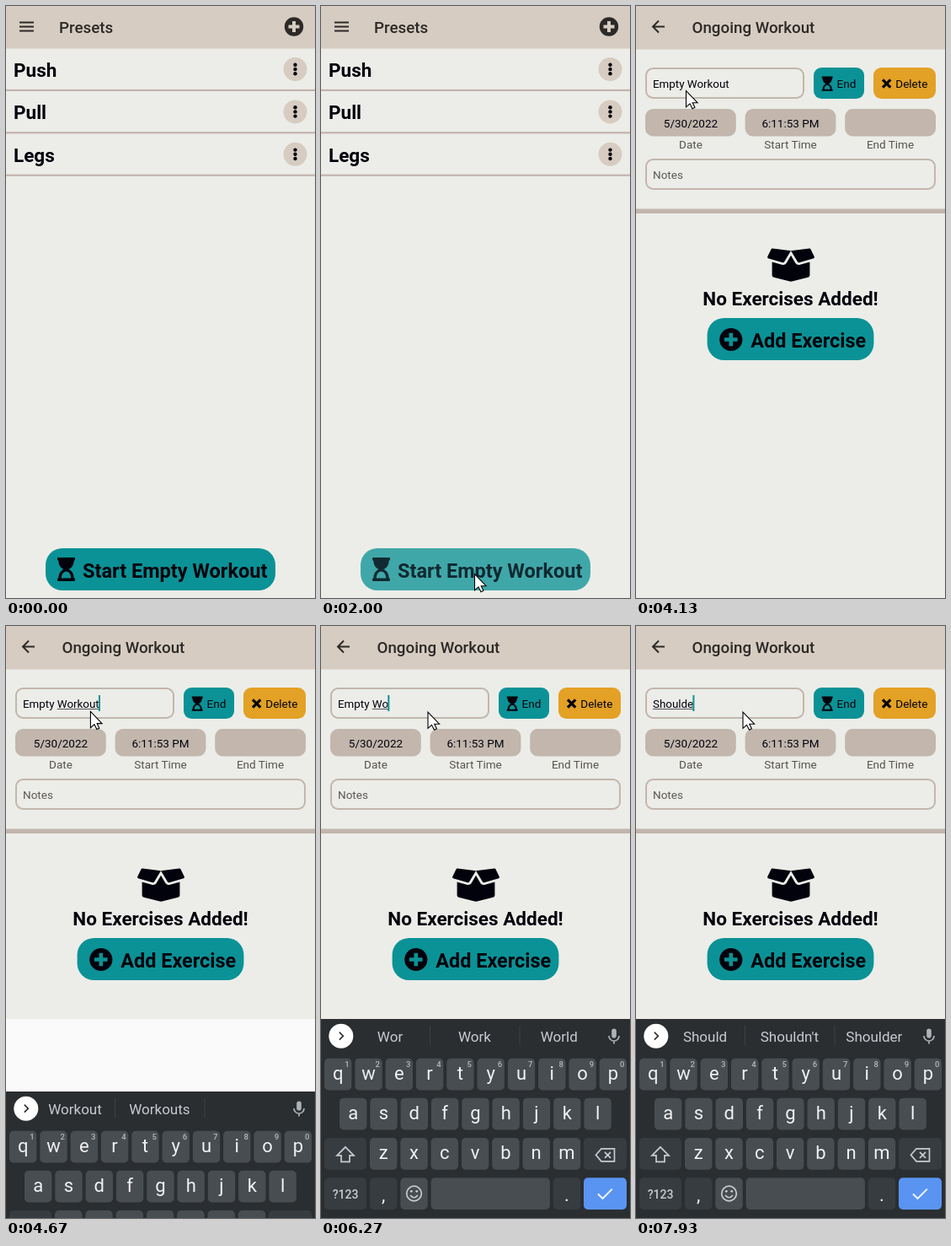
An HTML page that plays this animation: 367 px wide and 702 px high, repeating every 8 s.

```html
<!DOCTYPE html>
<html lang="en">
<head>
<meta charset="utf-8">
<title>Workout app</title>
<style>
  html, body { margin: 0; width: 100%; height: 100%; overflow: hidden; background: #ecede8; }
  svg { display: block; font-family: Roboto, sans-serif; }
  text { white-space: pre; }
</style>
</head>
<body>
<svg id="stage" width="367" height="702" viewBox="0 0 367 702"></svg>
<script>
const INK = '#02020c', DARK = '#2d2927', PAPER = '#ecede8', SAND = '#d7ccc1',
  TAUPE = '#c2b6ad', TEAL = '#0b9296', KEY = '#484d51', FUNC_KEY = '#373c41', PALE = '#c8ccd0';
const RADIUS = 9.3, NAME_SIZE = 13.35;

// SVG helpers
const rect = (x, y, w, h, fill, r = 0, extra = '') =>
  `<rect x="${x}" y="${y}" width="${w}" height="${h}" rx="${r}" fill="${fill}" ${extra}/>`;
const circle = (x, y, r, fill, extra = '') =>
  `<circle cx="${x}" cy="${y}" r="${r}" fill="${fill}" ${extra}/>`;
const text = (s, x, y, size, fill = INK, weight = 400, anchor = 'start', extra = '') =>
  `<text x="${x}" y="${y}" font-size="${size}" fill="${fill}" font-weight="${weight}" text-anchor="${anchor}" ${extra}>${s}</text>`;
const label = (s, x, y, size, fill, weight, extra) => text(s, x, y, size, fill, weight, 'middle', extra);
const line = (d, color, width, extra = '') =>
  `<path d="${d}" fill="none" stroke="${color}" stroke-width="${width}" ${extra}/>`;
const shape = (d, x = 0, y = 0, scale = 1) =>
  `<path d="${d}" transform="translate(${x} ${y}) scale(${scale})" fill="${INK}" fill-rule="evenodd"/>`;
const range = (n, draw) => Array.from({ length: n }, (_, i) => draw(i)).join('');
const outline = (x, y, w, h) =>
  rect(x + 1, y + 1, w - 2, h - 2, 'none', RADIUS - 1, `stroke="${TAUPE}" stroke-width="2"`);

const HOURGLASS = 'M1 0H20Q21 0 21 1V2.5Q21 3.5 19.7 3.5C19.7 8.5 17 12.7 13.1 14C17 15.3 19.7 19.5 19.7 24.5' +
  'Q21 24.5 21 25.5V27Q21 28 20 28H1Q0 28 0 27V25.5Q0 24.5 1.3 24.5C1.3 19.5 4 15.3 7.9 14' +
  'C4 12.7 1.3 8.5 1.3 3.5Q0 3.5 0 2.5V1Q0 0 1 0ZM4.8 24.5H16.2C16.2 20.2 13.7 16.6 10.5 16.6S4.8 20.2 4.8 24.5Z';
const OPEN_BOX = 'M5.6 18.8L18 22.3Q21 22.7 22.6 20.2L28 11L33.4 20.2Q35 22.7 38 22.3L50.4 18.8V34.5' +
  'Q50.4 36.6 48.3 37.1L29.4 41.8Q28 42.1 26.6 41.8L7.7 37.1Q5.6 36.6 5.6 34.5Z' +
  'M28 5.6L6.1 2.8Q5 2.7 4.6 3.6L.2 12.6Q-.3 14.1 1 14.6L18.3 19.5Q19.4 19.8 20 18.9Z' +
  'M28 5.6L49.9 2.8Q51 2.7 51.4 3.6L55.8 12.6Q56.3 14.1 55 14.6L37.7 19.5Q36.6 19.8 36 18.9Z';
const POINTER = 'M0 0V19.3L4.5 15.3L7.5 21.2L10.4 19.8L7.7 14.2H13.6Z';

const presetRow = (name, i) => {
  const y = 50.4 * i;
  return text(name, 9, 84 + y, 22.5, INK, 700) + rect(0, 98.8 + y, 367, 2.2, '#c3b4ae') +
    circle(343.5, 75 + y, 14, SAND) + range(3, k => circle(343.5, 69.8 + 5.2 * k + y, 2.2, INK));
};

const presets =
  rect(0, 0, 367, 50.5, SAND) +
  line('M16 19.5H33M16 24.5H33M16 29.5H33', DARK, 1.9) +
  text('Presets', 63, 31.8, 18.75, DARK, 500) +
  circle(342, 24.5, 11.2, DARK) + line('M335.5 24.5H348.5M342 18V31', SAND, 4) +
  ['Push', 'Pull', 'Legs'].map(presetRow).join('') +
  `<g id="start">${rect(47, 643, 273, 50, TEAL, 20)}${shape(HOURGLASS, 61, 654)}` +
  text('Start Empty Workout', 91, 677.5, 23.5, INK, 700) + '</g>';

const workout =
  rect(0, 0, 367, 702, PAPER) + rect(0, 0, 367, 51, SAND) + rect(0, 51, 367, 1, '#e2dcd4') +
  line('M34 24.5H20.5M27 17.5L20 24.5L27 31.5', DARK, 2) +
  text('Ongoing Workout', 66.5, 31.8, 18.75, DARK, 500) +
  outline(11, 73, 189, 37) + text('', 20, 97, NAME_SIZE, INK, 400, 'start', 'id="name"') +
  rect(0, 98, 0, 1, '#54545c', 0, 'id="underline"') + rect(0, 82, 2, 19, TEAL, 0, 'id="caret"') +
  rect(211, 73, 60, 37, TEAL, RADIUS) + shape(HOURGLASS, 220.7, 83.5, .62) + text('End', 238.5, 97, 13.5) +
  rect(282, 73, 74, 37, '#e3a125', RADIUS) + line('M293 87.3L302.3 96.6M302.3 87.3L293 96.6', INK, 3.2) +
  text('Delete', 308.3, 97, 13.5) +
  ['Date', 'Start Time', 'End Time'].map((s, i) =>
    rect(11 + 118.6 * i, 122, 107.8, 32.5, TAUPE, RADIUS) + label(s, 65 + 118.5 * i, 169, 13.5, '#57534f')).join('') +
  label('5/30/2022', 65, 143.5, 13.5) + label('6:11:53 PM', 183.5, 143.5, 13.5) +
  outline(11, 181, 345, 37) + text('Notes', 20, 205, 13.5, '#5c5855') +
  rect(0, 240.5, 367, 5.5, TAUPE) +
  shape(OPEN_BOX, 156, 284.7) + label('No Exercises Added!', 183.5, 355, 22.5, INK, 700) +
  rect(84.6, 370, 197.8, 50, TEAL, 20) +
  circle(112.8, 395.5, 13.6, INK) + line('M105 395.5H120.6M112.8 387.7V403.3', TEAL, 4.6) +
  text('Add Exercise', 136.3, 404.8, 23.4, INK, 700);

const key = (x, y, w = 32.4, fill = KEY) => rect(x, y, w, 37.7, fill, 5);
const letterRow = (letters, x, y) => [...letters].map((c, i) =>
  key(x + 36.3 * i - 16.2, y) + label(c, x + 36.3 * i, y + 25, 22, '#f0f1f2', 400, 'class="letter"')).join('');
const keyboard =
  rect(0, 466, 367, 240, '#2a2e31') +
  circle(23.8, 486.2, 14.5, '#fff') + line('M21.8 481.7L26.3 486.2L21.8 490.7', '#333', 1.7) +
  rect(129, 474, 1, 23, '#3d4145') + rect(235.5, 474, 1, 23, '#3d4145') +
  range(3, i => label('', 82 + 100.4 * i, 493, 17, PALE, 400, 'class="hint"')) +
  rect(345.2, 477.5, 5.6, 11, '#aeb3b7', 2.8) +
  line('M342 486A6 6 0 0 0 354 486M348 492V495.5', '#aeb3b7', 1.7) +
  letterRow('qwertyuiop', 20.2, 512.7) +
  range(10, i => label((i + 1) % 10, 31 + 36.3 * i, 523, 9.5, '#b4b8bc', 500)) +
  letterRow('asdfghjkl', 38.2, 559.8) +
  key(4, 607, 50, FUNC_KEY) + letterRow('zxcvbnm', 74.2, 607) + key(312, 607, 51, FUNC_KEY) +
  line('M29 617.8L39 627.8H34V635.3H24V627.8H19Z', PALE, 1.7, 'id="shift"') +
  line('M333 619.8H348.5V634.8H333L326.5 627.3ZM337 623.8L344 630.8M344 623.8L337 630.8', PALE, 1.7) +
  key(4, 654.2, 50, FUNC_KEY) + label('?123', 29, 678.5, 14, PALE, 500) +
  key(58, 654.2, 32.4, FUNC_KEY) + label(',', 74.2, 681.5, 22, '#f0f1f2') +
  key(94.3, 654.2) +
  circle(110.5, 673, 8.8, 'none', `stroke="${PALE}" stroke-width="1.7"`) +
  circle(107.3, 670.3, 1.4, PALE) + circle(113.7, 670.3, 1.4, PALE) +
  line('M106 675Q110.5 680.5 115 675', PALE, 1.7) +
  key(130.6, 654.2, 141.3) + key(275.8, 654.2, 32.4, FUNC_KEY) + label('.', 292, 681.5, 22, '#f0f1f2') +
  key(312, 654.2, 51, '#5a94f2') + line('M329 673.5L334.5 679L345.8 667.7', '#fff', 1.8);

const $ = id => document.getElementById(id);
$('stage').innerHTML = presets + `<g id="workout">${workout}</g>` +
  `<g id="typing">${rect(0, 466, 367, 236, '#fafafa')}<g id="keyboard">${keyboard}</g></g>` +
  `<path id="pointer" d="${POINTER}" fill="#fff" stroke="#000" stroke-width="1.1"/>`;
const letters = document.querySelectorAll('.letter'), hints = document.querySelectorAll('.hint');
const pen = document.createElement('canvas').getContext('2d');
pen.font = `${NAME_SIZE}px Roboto, sans-serif`;

// Timelines: [ms, value...]
const names = [[0, 'Empty Workout'], [5730, 'Empty Workou'], [6000, 'Empty Worko'], [6130, 'Empty Work'],
  [6200, 'Empty Wor'], [6270, 'Empty Wo'], [6330, 'Empty '], [6400, 'Empt'], [6470, 'Em'], [6530, ''],
  [6670, 'S'], [7130, 'Sh'], [7330, 'Sho'], [7670, 'Shou'], [7870, 'Should'], [7930, 'Shoulde']];
const suggestions = [[0, 'Workout', 'Workouts', ''], [6130, 'Work', 'Workout', 'Works'], [6270, 'Wor', 'Work', 'World'],
  [6400, 'Empty', 'Emptying', 'Empties'], [6530, 'I', 'The', 'I\'m'], [6870, 'S', 'So', 'She'],
  [7400, 'Sho', 'Should', 'Show'], [7730, 'Shou', 'Should', 'Shoulder'], [7930, 'Should', 'Shouldn\'t', 'Shoulder']];
const pointerPath = [[1000, 208, 698], [1270, 182.5, 673.5], [2200, 182.5, 673.5], [2600, 258.5, 586.5],
  [2670, 267, 564], [2870, 275, 490], [3130, 226, 325], [3400, 122, 186], [3530, 105, 165],
  [3800, 30, 122], [4070, 59.5, 100.5], [4470, 59.5, 100.5], [4800, 127, 102]];

const current = (list, t) => list.findLast(entry => entry[0] <= t);
const progress = (t, from, to) => Math.min(1, Math.max(0, (t - from) / (to - from)));
const easeOut = p => 1 - (1 - p) ** 3;

function pointerAt(t) {
  const i = pointerPath.findLastIndex(p => p[0] <= t);
  const a = pointerPath[i], b = pointerPath[i + 1] || a;
  const p = a === b ? 0 : progress(t, a[0], b[0]);
  return `translate(${a[1] + (b[1] - a[1]) * p} ${a[2] + (b[2] - a[2]) * p})`;
}

function drawField(t) {
  const name = current(names, t)[1];
  const word = 20 + pen.measureText(name.slice(0, name.lastIndexOf(' ') + 1)).width;
  const end = 20 + pen.measureText(name).width;
  const focused = t >= 4400;
  $('name').textContent = name;
  $('underline').setAttribute('x', word);
  $('underline').setAttribute('width', focused ? end - word : 0);
  $('caret').setAttribute('x', end - .7);
  $('caret').setAttribute('opacity', focused && !(t >= 5470 && t < 5730) ? 1 : 0);
}

function drawKeyboard(t) {
  const caps = t >= 6530 && t < 6730;
  $('typing').setAttribute('visibility', t > 4530 ? 'visible' : 'hidden');
  $('keyboard').setAttribute('transform', `translate(0 ${236 * (1 - easeOut(progress(t, 4538, 5000)))})`);
  $('shift').setAttribute('fill', caps ? PALE : 'none');
  for (const el of letters)
    el.textContent = caps ? el.textContent.toUpperCase() : el.textContent.toLowerCase();
  const words = current(suggestions, t);
  hints.forEach((el, i) => el.textContent = words[i + 1]);
}

function draw(t) {
  const pressed = progress(t, 1430, 1530) - progress(t, 1860, 2060);
  for (const el of $('start').children) el.setAttribute('opacity', 1 - .8 * pressed);
  const enter = easeOut(progress(t, 2070, 2400));
  $('workout').setAttribute('opacity', enter);
  $('workout').setAttribute('transform', `translate(0 ${56 * (1 - enter)})`);
  drawField(t);
  drawKeyboard(t);
  $('pointer').setAttribute('visibility', t >= 1000 ? 'visible' : 'hidden');
  if (t >= 1000) $('pointer').setAttribute('transform', pointerAt(t));
}

// Time advances in 15 steps per second, rounded to 10 ms.
const start = performance.now(), STEP = 1000 / 15;
function tick() {
  const elapsed = (performance.now() - start) % 8000;
  draw(Math.round(Math.floor(elapsed / STEP + .15) * STEP / 10) * 10 % 8000);
  requestAnimationFrame(tick);
}
tick();
</script>
</body>
</html>
```
